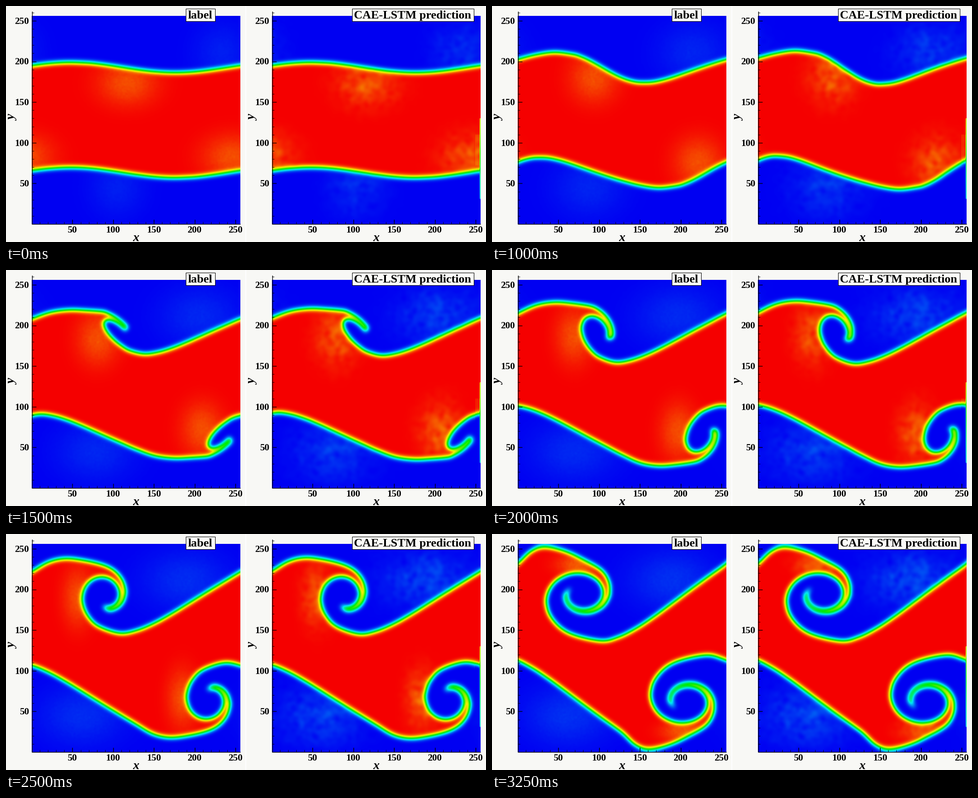
A matplotlib script for the animation above (3500 ms loop, 1065x526 px).

```python
import numpy as np
import matplotlib.pyplot as plt
from matplotlib.animation import FuncAnimation
from matplotlib.colors import LinearSegmentedColormap
from matplotlib.patches import Rectangle

W, H, DPI = 1065, 526, 100
N = 256                                  # grid cells per side
LEFT, TOP, BOTTOM, SPAN = 57, 22, 486, 463
RIGHT = LEFT + SPAN
FRAMES, INTERVAL = 14, 250
SERIF = "Liberation Serif"
BACK = "#f8f8f5"

cmap = LinearSegmentedColormap.from_list(
    "flow", ["#0000f2", "#00e8f6", "#00ec00", "#f6f200", "#f50000"], N=512)


def smoothstep(a, b, t):
    s = np.clip((t - a) / (b - a), 0, 1)
    return s * s * (3 - 2 * s)


# ---- interface between the fluids, in pixels of the left panel
def wave(x, t):
    """Young wave: a cosine that grows and leans forward."""
    amp = 11.5 + 1.4 * t ** 2
    lean = 0.28 * (t / 4) ** 3
    a = 2 * np.pi * (x - 145) / SPAN
    return 137 - amp * np.cos(a + lean * (1 - np.cos(a)))


def roll(t):
    """Grown wave: crest, finger along a tightening spiral, trough, braid.

    Spiral angles run clockwise from straight down.
    """
    v = (t - 6) / 7
    w = max(v, 0)
    edge, crest = (LEFT, 109 - 43 * v), (140 - 25 * w ** 2, 89 - 60 * v)
    trough = (306 - 66 * v * (2 - v), 187 + 51 * v * (1.4 - 0.4 * v))
    cx, cy = 250 - 50 * v, 136
    rx, ry = 40 + 76 * w ** 1.3, 50 + 60 * v - 14 * v ** 2
    tilt = 0.8 * (1 - w) ** 3
    tip = 4.6 + 3.9 * w ** 1.2

    def spiral(a, width):
        rho = 1 / (1 + a / 3.2)
        dx = -np.sin(a) * (rx * rho + width)
        dy = np.cos(a) * (ry * rho + width)
        return np.column_stack([cx + dx + tilt * dy, cy + dy])

    a = np.linspace(np.pi, tip, 9)
    width = 4 + 14 * (1 + v) * np.exp((np.pi - a) / 1.5)
    outer = spiral(a[:-1], width[:-1])
    inner = spiral(np.linspace(tip, 0.3, 15), 0)

    neck = outer[0]
    rise = ((edge[0] + crest[0]) / 2, crest[1] + 0.27 * (edge[1] - crest[1]))
    fall = ((crest[0] + neck[0]) / 2, crest[1] + 0.3 * (neck[1] - crest[1]))

    q = np.linspace(0, 1, 8)[:-1]
    climb = q ** 2 * (2.6 - 2.4 * q + 0.8 * q ** 2)
    braid = np.column_stack([trough[0] + (RIGHT - trough[0]) * q,
                             trough[1] + (edge[1] - trough[1]) * climb])
    return np.array([edge, rise, crest, fall]), np.vstack([outer, inner]), braid


def interface(t):
    head, core, braid = roll(max(t, 5))
    grown = np.vstack([head, core, braid])
    mid = np.linspace(head[-1, 0], braid[0, 0], len(core) + 2)[1:-1]
    x = np.concatenate([head[:, 0], mid, braid[:, 0]])
    young = np.column_stack([x, wave(x, min(t, 5))])
    return young + smoothstep(4, 6, t) * (grown - young)


def smooth_curve(pts, steps=14):
    """Periodic spline through the points, in grid units."""
    p = np.column_stack([(pts[:, 0] - LEFT) * N / SPAN,
                         (BOTTOM - pts[:, 1]) * N / (BOTTOM - TOP)])
    shift = np.array([N, 0])
    p = np.vstack([p[-1] - shift, p, p[0] + shift, p[1] + shift])
    m = (p[2:] - p[:-2]) / 2
    p = p[1:-1]
    s = np.linspace(0, 1, steps, endpoint=False)[None, :, None]
    c = ((1 + 2 * s) * (1 - s) ** 2 * p[:-1, None]
         + s * (1 - s) ** 2 * m[:-1, None]
         + s * s * (3 - 2 * s) * p[1:, None]
         + s * s * (s - 1) * m[1:, None])
    return np.vstack([c.reshape(-1, 2), p[-1]])


# ---- scalar field
def fill_below(curve):
    """Cell coverage under a curve that may fold back on itself."""
    rows, cols = np.arange(N), np.arange(N) + 0.5
    area = np.zeros((N, N))
    for shift in (-N, 0, N):
        x, y = curve[:, 0] + shift, curve[:, 1]
        a, b = x[:-1, None] <= cols, x[1:, None] <= cols
        for k, j in zip(*np.nonzero(a != b)):
            f = (cols[j] - x[k]) / (x[k + 1] - x[k])
            yc = y[k] + f * (y[k + 1] - y[k])
            sign = 1 if x[k + 1] > x[k] else -1
            area[:, j] += sign * np.clip(yc - rows, 0, 1)
    return np.clip(area, 0, 1)


def gauss_matrix(sigma, wrap):
    d = np.abs(np.subtract.outer(np.arange(N), np.arange(N))).astype(float)
    if wrap:
        d = np.minimum(d, N - d)
    g = np.exp(-0.5 * (d / sigma) ** 2)
    return g / g.sum(axis=1, keepdims=True)


def blur(a, sigma):
    return gauss_matrix(sigma, False) @ a @ gauss_matrix(sigma, True).T


def mottle(seed, sigma, depth):
    z = blur(np.random.default_rng(seed).standard_normal((N, N)), sigma)
    return np.clip(1 + depth * z / z.std(), 0, 2)


def twin(a):
    """The lower layer is the upper one turned over and moved half a period."""
    return np.roll(a[::-1], N // 2, axis=1)


PX = LEFT + (np.arange(N) + 0.5) * SPAN / N
PY = BOTTOM - (np.arange(N) + 0.5) * (BOTTOM - TOP) / N


def patch(cx, cy, sx, sy, amp):
    dx = (PX - cx + SPAN / 2) % SPAN - SPAN / 2
    g = amp * np.outer(np.exp(-0.5 * ((PY - cy) / sy) ** 2),
                       np.exp(-0.5 * (dx / sx) ** 2))
    return g + twin(g)


def field(t, grain, cool_gain):
    upper = blur(fill_below(smooth_curve(interface(t))), 3.0)
    c = np.clip(upper + twin(upper) - 1, 0, 1)
    late = smoothstep(10, 13, t)
    warm = (patch(270 - 11 * t, 172 - 3 * t, 45 - 2.2 * t, 34 + t,
                  0.08 * (1 - late))
            + patch(190, 68, 32, 16, 0.09 * late))
    cool = patch(max(478 - 8 * t, 400), 103, min(42 + 3 * t, 65), 45,
                 0.032 + 0.0015 * t)
    return c * (1 - warm * grain) + (1 - c) * cool * grain * cool_gain


fine, coarse = mottle(3, 0.8, 0.04), mottle(8, 2.6, 0.22)


def label_field(n):
    return field(n, fine, 1.0)


def predicted_field(n):
    lead = 0.35 * np.sin(np.pi * n / (FRAMES - 1))
    c = field(n + lead, coarse, 1.2)
    c[72:110, -6::2] -= 0.06
    c[31:130, -1] = np.linspace(0.28, 0.68, 99)
    return np.clip(c, 0, 1)


# ---- stage
fig = plt.figure(figsize=(W / DPI, H / DPI), dpi=DPI, facecolor=BACK)
ax = fig.add_axes([0, 0, 1, 1])
ax.axis("off")


def write(x, y, s, px, **kw):
    kw = {"ha": "center", "va": "baseline", **kw}
    ax.text(x, y, s, family=SERIF, weight="bold", color="black",
            fontsize=px * 72 / DPI, zorder=6, **kw)


def line(x0, y0, x1, y1, px=1.4):
    ax.plot([x0, x1], [y0, y1], color="black", lw=px * 72 / DPI,
            solid_capstyle="butt", zorder=4)


def panel(x0, title, box_left, box_right):
    img = ax.imshow(np.zeros((N, N)), cmap=cmap, vmin=0, vmax=1,
                    origin="lower", interpolation="bilinear", aspect="auto",
                    extent=(x0, x0 + SPAN, BOTTOM, TOP), zorder=2)
    line(x0 + 0.5, 12, x0 + 0.5, BOTTOM)
    line(x0, BOTTOM - 0.5, x0 + SPAN, BOTTOM - 0.5)
    for v in range(10, 261, 10):
        major = v % 50 == 0
        size, weight = (10, 1.4) if major else (5, 0.9)
        x = x0 + v * SPAN / N
        y = BOTTOM - v * (BOTTOM - TOP) / N
        line(x0, y, x0 + size, y, weight)
        if v < N:
            line(x, BOTTOM, x, BOTTOM - size, weight)
        if major:
            write(x0 - 6, y + 7, str(v), 21.3, ha="right")
            write(x - 0.5, 505, str(v), 21.3)
    write(x0 + SPAN / 2, 524, "x", 28, style="italic")
    write(x0 - 43, 249, "y", 28, style="italic", rotation=90, va="center")
    ax.add_patch(Rectangle((box_left + 0.5, 5.5), box_right - box_left, 28,
                           fc="#fbfbf8", ec="black", lw=0.8, zorder=5))
    write((box_left + box_right) / 2, 28, title, 26.2)
    return img


left = panel(LEFT, "label", 398, 463)
right = panel(590, "CAE-LSTM prediction", 767, 1037)
ax.plot([531.5, 531.5], [0, H], color="white", lw=1.4, zorder=1)
ax.set_xlim(0, W)
ax.set_ylim(H, 0)


def draw(n):
    left.set_data(label_field(n))
    right.set_data(predicted_field(n))
    return left, right


anim = FuncAnimation(fig, draw, frames=FRAMES, interval=INTERVAL,
                     repeat=True, repeat_delay=0)
plt.show()
```
